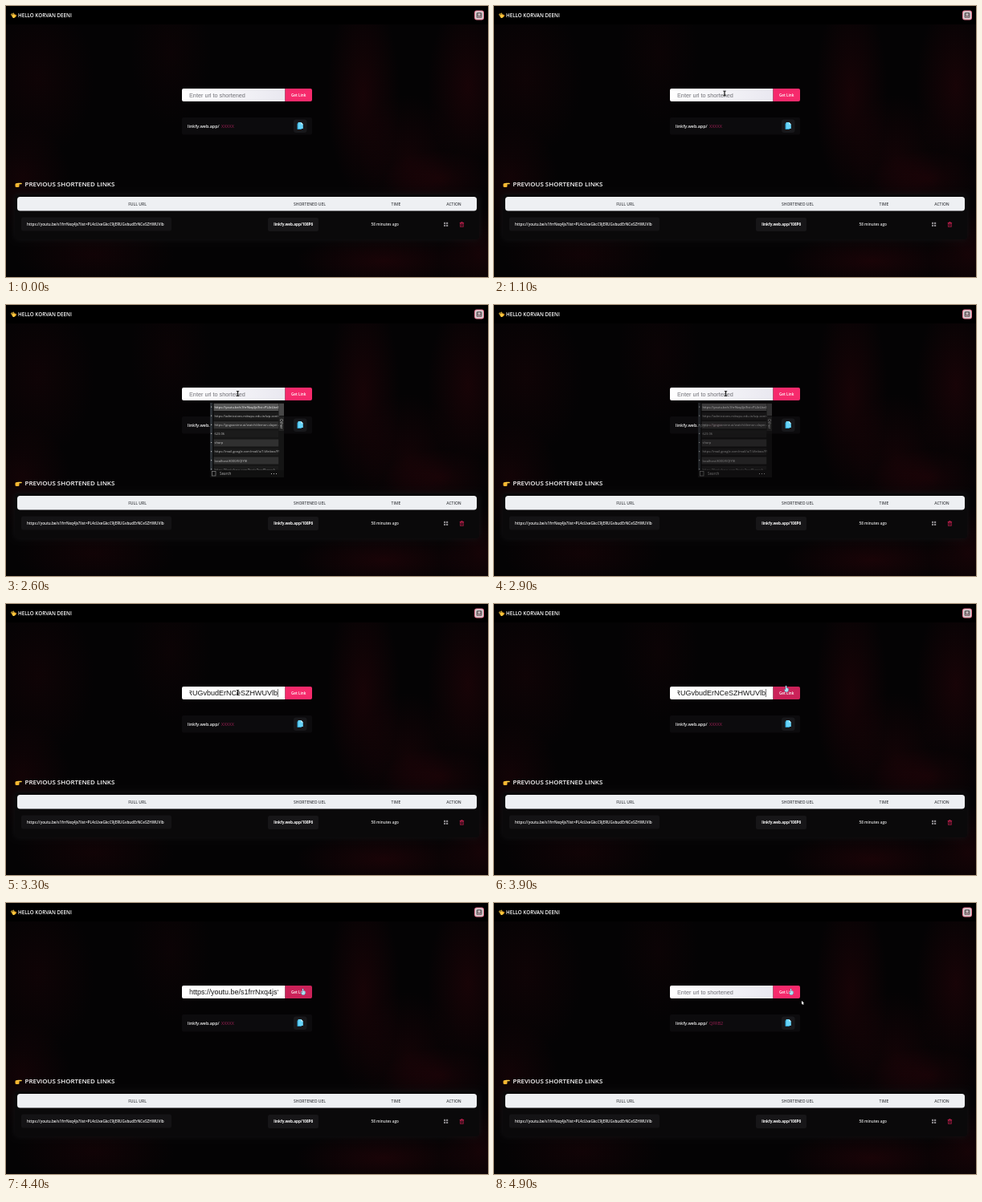
Recreate the animation shown at these times as an HTML page with a canvas. Size 600 px wide and 338 px high, loop 5000 ms.

```html
<!DOCTYPE html>
<html lang="en">
<head>
<meta charset="utf-8">
<title>Link shortener</title>
<style>
html, body { margin: 0; width: 100%; height: 100%; overflow: hidden; background: #040304; }
canvas { display: block; width: 600px; height: 338px; }
</style>
</head>
<body>
<canvas id="stage" width="600" height="338"></canvas>
<script>
const ctx = document.getElementById('stage').getContext('2d');
const UI = '"Open Sans", "Noto Sans", sans-serif';
const ARIAL = '"Liberation Sans", Arial, sans-serif';
const URL_TEXT = 'https://youtu.be/s1frrNxq4js?list=PL4cUxeGkcC9jERUGvbudErNCeSZHWUVlb';
const LOOP = 5000, STEP = 100;

// time, x, y of the pointer
const PATH = [
  [900, 12, 334], [1000, 190, 205], [1100, 287, 109], [1300, 287, 109],
  [1800, 288.5, 110.5], [3400, 288.5, 110.5], [3600, 302, 106], [3700, 322, 101],
  [3800, 345, 100], [3900, 364, 106], [4000, 370, 111], [4700, 370, 111],
  [4800, 377, 117], [4900, 383, 122]
];

const CLIPS = [
  URL_TEXT.slice(0, 42), 'https://admissions.mitwpu.edu.in/wp-conten',
  'https://gogoanime.ai/watch/demon-slayer-e', '623.06', 'sharp',
  'https://mail.google.com/mail/u/1/#inbox/FM', 'localhost:8000/EQIYI8',
  'https://fontshare.com/fonts/load/branch'
];

function box(x, y, w, h, fill, r = 0) {
  ctx.fillStyle = fill;
  ctx.beginPath();
  ctx.roundRect(x, y, w, h, r);
  ctx.fill();
}

function text(s, x, y, size, color, { weight = 600, align = 'left', font = UI } = {}) {
  ctx.font = `${weight} ${size}px ${font}`;
  ctx.textAlign = align;
  ctx.fillStyle = color;
  ctx.fillText(s, x, y);
}

function shape(points, fill, stroke) {
  ctx.beginPath();
  points.forEach(([x, y]) => ctx.lineTo(x, y));
  ctx.closePath();
  if (stroke) {
    ctx.strokeStyle = stroke;
    ctx.lineWidth = 0.8;
    ctx.stroke();
  }
  ctx.fillStyle = fill;
  ctx.fill();
}

function at(x, y, draw, angle = 0) {
  ctx.save();
  ctx.translate(x, y);
  ctx.rotate(angle);
  draw();
  ctx.restore();
}

function smoke(x, y, rx, ry, alpha) {
  at(x, y, () => {
    ctx.scale(rx, ry);
    const g = ctx.createRadialGradient(0, 0, 0, 0, 0, 1);
    g.addColorStop(0, `rgba(75,5,14,${alpha})`);
    g.addColorStop(1, 'rgba(75,5,14,0)');
    ctx.fillStyle = g;
    ctx.fillRect(-1, -1, 2, 2);
  });
}

function background() {
  box(0, 0, 600, 338, '#040304');
  smoke(40, 90, 70, 100, 0.15);
  smoke(20, 215, 60, 70, 0.2);
  smoke(110, 310, 100, 45, 0.18);
  smoke(205, 60, 50, 90, 0.1);
  smoke(445, 110, 45, 130, 0.27);
  smoke(500, 190, 60, 80, 0.2);
  smoke(575, 100, 50, 110, 0.28);
  smoke(540, 215, 70, 35, 0.25);
  smoke(470, 318, 110, 35, 0.3);
  smoke(590, 310, 50, 60, 0.25);
  box(0, 0, 600, 23, '#000');
}

function hand() {
  box(-2, -1.5, 4.2, 4, '#ffc83d', 1.5);
  box(-2.2, -3.5, 1, 3, '#ffc83d', 0.5);
  box(-0.7, -3.9, 1, 3, '#ffc83d', 0.5);
  box(0.8, -3.5, 1, 3, '#ffc83d', 0.5);
  box(2, -0.5, 1.3, 2.5, '#ef9f20', 0.6);
}

function header() {
  at(9.5, 12.3, hand, -0.5);
  text('HELLO KORVAN DEENI', 15, 14.2, 6.25, '#fff');
  box(583, 5.5, 12, 12, '#e77a94', 3);
  box(584, 6.5, 10, 10, '#d9d2d4', 2);
  box(585.5, 8, 7, 7, '#6d6468', 1.5);
  box(587.5, 9, 3, 3, '#c9bdc0', 1.5);
  box(586.5, 12.5, 5, 2, '#a8878f', 1);
}

function table() {
  at(15, 222.5, () => {
    box(-3.5, -1.5, 5, 5, '#f5b52f', 1.5);
    box(-1, -1.8, 5.8, 1.6, '#ffd04a', 0.8);
  });
  text('PREVIOUS SHORTENED LINKS', 23.5, 224.8, 7.95, '#fff');

  ctx.save();
  ctx.shadowColor = '#131214';
  ctx.shadowBlur = 7;
  box(11, 235, 578, 56, '#0a090a', 4);
  ctx.restore();
  box(14, 238, 572, 17.5, '#eef0f3', 3.5);
  [['FULL URL', 163.5], ['SHORTENED UEL', 378], ['TIME', 485.5], ['ACTION', 557.5]]
    .forEach(([s, x]) => text(s, x, 248.6, 5, '#44464b', { align: 'center' }));

  box(19, 263.5, 187, 17, '#141315', 2.5);
  text(URL_TEXT, 26, 273.8, 4.65, '#eee');
  box(326, 264, 63, 17, '#171618', 2.5);
  text('linkfy.web.app/108P6', 333.3, 274.3, 4.58, '#fff', { weight: 700 });
  text('58 minutes ago', 454.5, 274.3, 4.67, '#e6e6e6');

  for (const [x, y] of [[545, 269.8], [548, 269.8], [545, 272.8], [548, 272.8]])
    box(x, y, 2.2, 2.2, '#89868a');
  box(564.7, 270, 5.4, 0.9, '#b51d49');
  box(566.3, 269.2, 2.2, 0.8, '#b51d49');
  ctx.strokeStyle = '#b51d49';
  ctx.lineWidth = 0.8;
  ctx.strokeRect(565.5, 271.2, 3.8, 4);
  box(567, 272, 0.8, 2.5, '#b51d49');
}

function form(t) {
  const filled = t >= 3000 && t < 4500;
  const pressed = t >= 3900 && t < 4800;
  const g = ctx.createLinearGradient(219, 0, 348, 0);
  g.addColorStop(0, '#fff');
  g.addColorStop(1, filled ? '#fff' : '#e9e8f0');
  box(219, 103, 128.5, 16, g, [2, 0, 0, 2]);
  box(347.5, 103, 33.5, 16, pressed ? '#cb2259' : '#f62a6c', [0, 2, 2, 0]);
  text('Get Link', 355, 113, 4.64, '#fff');

  ctx.save();
  ctx.beginPath();
  ctx.rect(228.3, 103, 110.7, 16);
  ctx.clip();
  const style = { weight: 400, font: ARIAL };
  if (!filled) text('Enter url to shortened', 228, 114, 7.28, '#6e6e74', style);
  else if (t < 4100) {
    text(URL_TEXT, 338, 114.3, 9, '#161616', { ...style, align: 'right' });
    box(338.2, 106, 0.6, 10, '#222');
  } else text(URL_TEXT, 228, 114.3, 9, '#161616', style);
  ctx.restore();

  box(219, 139, 162, 21.5, '#0c0b0d', 2);
  text('linkfy.web.app/', 226, 152, 5.35, '#f4f4f4');
  text(t < 4500 ? 'XXXXX' : 'QFRB2', 268, 152, 5.5, '#9a1f53', { weight: 400 });
  box(358, 141.5, 16.5, 16.5, '#18181b', 3);
  box(362.5, 146.2, 5.5, 7.8, '#2c9fd0', 0.8);
  shape([[363.6, 145], [367.3, 145], [369.8, 147.5], [369.8, 153], [363.6, 153]], '#68d5fa');
  shape([[367.3, 145], [369.8, 147.5], [367.3, 147.5]], '#d3f4ff');
}

function clipboard(alpha) {
  ctx.save();
  ctx.globalAlpha = alpha;
  box(254, 122, 92, 93, '#151515');
  box(254, 122, 3.4, 84, '#2b3035');
  ctx.save();
  ctx.beginPath();
  ctx.rect(254, 122, 85.5, 83.5);
  ctx.clip();
  CLIPS.forEach((s, i) => {
    const y = 123 + i * 11.1;
    box(258.5, y, 81, 9, i ? (i % 2 ? '#1b1b1b' : '#303030') : '#555');
    box(255, y + 3.5, 1.2, 1.2, '#aaa');
    text(s, 259.5, y + 5.9, 4, i ? '#c5c5c5' : '#fff', { weight: 400 });
  });
  ctx.restore();
  box(257.4, 122, 0.8, 84, '#000');
  box(339.5, 123, 6.5, 15, '#474747');
  box(339.5, 139, 6.5, 18, '#242424');
  at(341.3, 142, () => text('Other', 0, 0, 4.6, '#ccc', { weight: 400 }), Math.PI / 2);
  box(254, 206, 92, 9, '#101010');
  ctx.strokeStyle = '#888';
  ctx.lineWidth = 0.7;
  ctx.strokeRect(256.5, 207.5, 4.5, 5.5);
  text('Search', 266, 212.4, 4.6, '#aaa', { weight: 400 });
  [330, 333, 336].forEach(x => box(x, 210, 1, 1, '#bbb'));
  ctx.restore();
}

const arrow = () =>
  shape([[0, 0], [0, 4.4], [1, 3.5], [1.8, 5], [2.5, 4.6], [1.8, 3.2], [3, 3]], '#fff', '#222');

function beam() {
  box(-0.6, -3, 1.2, 6, '#111');
  box(-1.7, -3.3, 3.4, 0.9, '#111');
  box(-1.7, 2.4, 3.4, 0.9, '#111');
}

const pointer = () =>
  shape([[-1, -4], [0, -4], [0.3, -1.3], [2.4, -0.6], [2.4, 2], [1.4, 3.4], [-1.4, 3.4], [-2.6, 0.6], [-1, 1]],
    '#a9e2f2', '#456a86');

function cursor(t) {
  if (t < PATH[0][0]) return;
  const i = PATH.findIndex(p => p[0] > t);
  const [t1, x1, y1] = i < 0 ? PATH.at(-1) : PATH[i];
  const [t0, x0, y0] = i < 0 ? PATH.at(-1) : PATH[i - 1];
  const k = t1 > t0 ? (t - t0) / (t1 - t0) : 0;
  const x = x0 + (x1 - x0) * k, y = y0 + (y1 - y0) * k;
  const inside = y > 103 && y < 119;
  if (t >= 4800) at(370, 111, pointer);
  if (inside && x > 219 && x < 347) at(x, y, beam);
  else if (inside && x >= 347 && x < 375) at(x, y, pointer);
  else at(x, y, arrow);
}

function draw(now) {
  const t = Math.floor((now % LOOP) / STEP) * STEP;
  background();
  header();
  form(t);
  table();
  if (t >= 2500 && t < 3000) clipboard(t >= 2600 && t < 2900 ? 1 : 0.6);
  cursor(t);
  requestAnimationFrame(draw);
}
requestAnimationFrame(draw);
</script>
</body>
</html>
```
